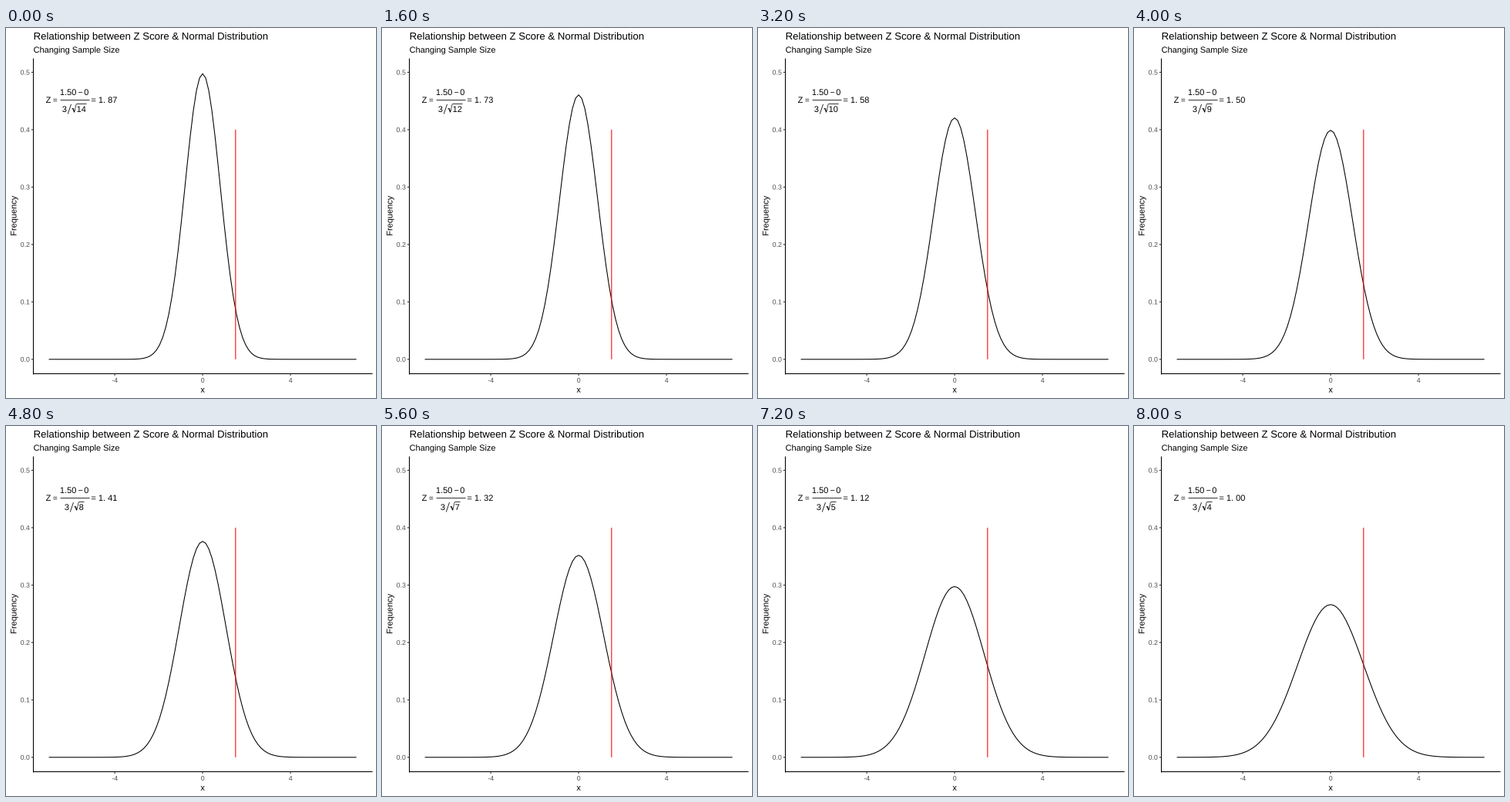
Recreate the animation shown at these times as a matplotlib script. Size 480x480 px, loop 8.8 s.

```python
import matplotlib.pyplot as plt
import numpy as np
from matplotlib.animation import FuncAnimation
from matplotlib.patches import PathPatch
from matplotlib.textpath import TextPath
from matplotlib.transforms import Affine2D

plt.rcParams["font.family"] = "Liberation Sans"

SIZE = 480
LINE = 1.07
MEAN, SAMPLE, SIGMA = 0, 1.5, 3
SIZES = range(14, 3, -1)
LEFT, RIGHT, TOP, BOTTOM = 35.4, 474.5, 38.9, 448.4
DIGIT = 6.12

# 72 dpi makes one point equal one pixel
fig = plt.figure(figsize=(SIZE / 72, SIZE / 72), dpi=72, facecolor="white")
ax = fig.add_axes([0, 0, 1, 1])
ax.set(xlim=(0, SIZE), ylim=(SIZE, 0))
ax.axis("off")


def px(x):
    return 255.07 + 28.5 * x


def py(y):
    return 429.8 - 744.7 * y


def line(xs, ys, color="black", width=LINE, **kw):
    return ax.plot(xs, ys, color=color, lw=width,
                   solid_capstyle="butt", **kw)[0]


def outline(x, y, text, size=11, align=0, angle=0):
    """Text as a path on its baseline; align 0 left, 0.5 centre, 1 right."""
    path = TextPath((0, 0), text, size=size)
    offset = -align * path.get_extents().x1
    place = (Affine2D().translate(offset, 0).rotate_deg(angle)
             .scale(1, -1).translate(x, y))
    return path.transformed(place)


def label(x, y, text, color="black", **kw):
    return ax.add_patch(PathPatch(outline(x, y, text, **kw), fc=color, lw=0,
                                  snap=False))


# Titles
label(35.6, 15, "Relationship between Z Score & Normal Distribution",
      size=13.2)
label(35.6, 32, "Changing Sample Size")
label(255.07, 472.8, "x", align=0.5)
label(13.5, 243.7, "Frequency", align=0.5, angle=90)

# Axes
line([LEFT, LEFT], [TOP, BOTTOM + 0.5])
line([LEFT - 0.5, RIGHT], [BOTTOM, BOTTOM])
for v in np.arange(6) / 10:
    line([LEFT - 2.6, LEFT], [py(v)] * 2, "#333333", snap=False)
    label(30.5, py(v) + 3.1, f"{v:.1f}", "#4d4d4d", size=8.8, align=1)
for v in (-4, 0, 4):
    line([px(v)] * 2, [BOTTOM, BOTTOM + 2.7], "#333333", snap=False)
    label(px(v), 460, str(v), "#4d4d4d", size=8.8, align=0.5)

# Fixed parts of the formula
label(51.6, 97, "Z")
label(60.9, 96.8, "=", size=10)
label(69.9, 87, "1.50")
label(93.6, 87, "\u2212", size=10.5)
label(101.2, 87, "0")
line([69.5, 108], [93.4, 93.4], width=0.8)

# Moving parts
x = np.linspace(-7, 7, 101)
curve = line(px(x), py(0 * x))
line([px(SAMPLE)] * 2, [py(0), py(0.4)], "red", snap=False)
three = label(72.8, 109, "3")
count = label(91.6, 109, "0")
result = label(110.4, 97, "=")
slash = line([], [], width=0.8)
root_tick = line([], [], width=0.7)
root_stem = line([], [], width=1.2)
root_bar = line([], [], width=0.8)


def draw(i):
    n = SIZES[i]
    sd = SIGMA / np.sqrt(n)
    curve.set_ydata(py(np.exp(-(x - MEAN) ** 2 / (2 * sd ** 2))
                       / (sd * np.sqrt(2 * np.pi))))

    # The denominator stays centred under the bar
    digits = len(str(n))
    shift = DIGIT / 2 * (2 - digits)
    three.set_path(outline(72.8 + shift, 109, "3"))
    count.set_path(outline(91.6 + shift, 109, str(n)))
    slash.set_data(np.array([80.2, 84.5]) + shift, [111.5, 98.9])
    root_tick.set_data(np.array([85.3, 86.8, 88.7, 91.2]) + shift,
                       [105.2, 104.2, 109.2, 98.5])
    root_stem.set_data(np.array([86.8, 88.7]) + shift, [104.2, 109.2])
    root_bar.set_data([91 + shift, 91.8 + shift + DIGIT * digits],
                      [98.4, 98.4])

    whole, part = f"{(SAMPLE - MEAN) / sd:.2f}".split(".")
    result.set_path(outline(110.4, 97, f"= {whole}. {part}"))
    return curve, three, count, result, slash, root_tick, root_stem, root_bar


anim = FuncAnimation(fig, draw, frames=len(SIZES), interval=800, repeat=True,
                     repeat_delay=0)
plt.show()
```
